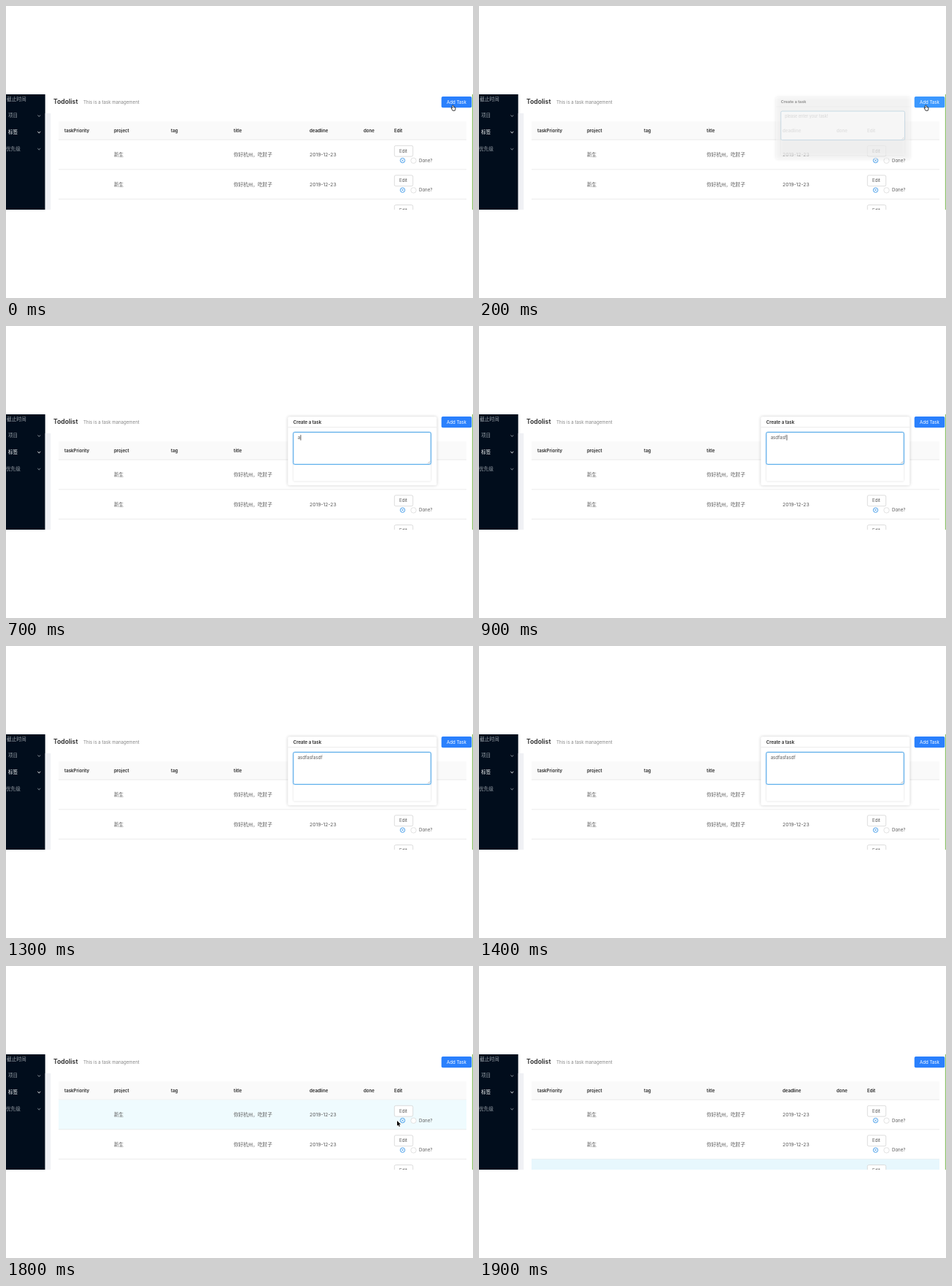
These frames come from a looping animation (640 px wide and 400 px high, 2 s). An HTML page with a canvas:

```html
<!DOCTYPE html>
<html lang="zh">
<head>
<meta charset="utf-8">
<title>Todolist</title>
<style>
  html, body { margin: 0; width: 100%; height: 100%; overflow: hidden; background: #fff; }
  canvas { display: block; width: 640px; height: 400px; }
</style>
</head>
<body>
<canvas id="stage"></canvas>
<script>
const W = 640, H = 400, STEP = 100, LOOP = 2000;
const TOP = 121, BOTTOM = 279;
const FONT = 'Inter, "Noto Sans CJK SC", "Noto Sans CJK", sans-serif';
const BLUE = '#2a80fd', BLUE_HOVER = '#3b98ff', INK = '#595959', DARK = '#262626';

const canvas = document.getElementById('stage');
const ctx = canvas.getContext('2d');
const dpr = window.devicePixelRatio || 1;
canvas.width = W * dpr;
canvas.height = H * dpr;

const lerp = (a, b, k) => a + (b - a) * k;
const clamp = v => Math.max(0, Math.min(1, v));

function text(str, x, y, color = INK, size = 6.1, weight = 400) {
  ctx.font = `${weight} ${size}px ${FONT}`;
  ctx.fillStyle = color;
  ctx.fillText(str, x, y);
}

function rect(x, y, w, h, color) {
  ctx.fillStyle = color;
  ctx.fillRect(x, y, w, h);
}

function box(x, y, w, h, r, fill, stroke, width = 0.8) {
  ctx.beginPath();
  ctx.roundRect(x, y, w, h, r);
  if (fill) { ctx.fillStyle = fill; ctx.fill(); }
  if (stroke) { ctx.strokeStyle = stroke; ctx.lineWidth = width; ctx.stroke(); }
}

function line(points, color, width = 0.8) {
  ctx.beginPath();
  points.forEach(([x, y]) => ctx.lineTo(x, y));
  ctx.strokeStyle = color;
  ctx.lineWidth = width;
  ctx.stroke();
}

function circle(x, y, r, color, width) {
  ctx.beginPath();
  ctx.arc(x, y, r, 0, 7);
  ctx.strokeStyle = color;
  ctx.lineWidth = width;
  ctx.stroke();
}

function shadow(blur, color, draw) {
  ctx.save();
  ctx.shadowBlur = blur * dpr;
  ctx.shadowColor = color;
  draw();
  ctx.restore();
}

function sidebar() {
  rect(0, TOP, 53.7, BOTTOM - TOP, '#010d1c');
  const grey = '#929aa2';
  text('截止时间', 1, 128, '#a3a9b0', 6.7);
  [['项目', 3, 150.5, grey], ['标签', 3, 173, '#fff'], ['优先级', 0, 196, grey]].forEach(([s, x, y, c]) => {
    text(s, x, y, c, 6.6);
    line([[43.4, y - 0.9], [45.3, y + 0.9], [47.2, y - 0.9]], c, 1);
  });
}

function header(hover) {
  text('Todolist', 65, 131.8, DARK, 8.7, 600);
  text('This is a task management', 106, 131.8, '#858585');
  box(596.7, 124, 41.6, 15.2, 2, hover ? BLUE_HOVER : BLUE);
  text('Add Task', 604, 131.8, '#fff');
}

function row(y, color) {
  if (color) rect(72, y, 559, 40.6, color);
  text('新生', 148, y + 20.7, INK, 6.6);
  text('你好杭州，吃肘子', 312, y + 20.7, INK, 6.6);
  text('2019-12-23', 416, y + 20.7, INK, 6.8);
  box(532.3, y + 8, 25.4, 14.8, 2, '#fff', '#d4d4d4');
  text('Edit', 539, y + 15.6);

  const cy = y + 28.3;
  circle(543.5, cy, 3.2, '#3a97e8', 0.9);
  line([[542.3, cy - 1.2], [544.7, cy + 1.2]], '#3a97e8', 0.8);
  line([[544.7, cy - 1.2], [542.3, cy + 1.2]], '#3a97e8', 0.8);
  box(554.9, cy - 3.4, 7.2, 7.2, 3.2, '#fff', '#d6d6d6', 0.7);
  text('Done?', 566, cy + 0.2);
  rect(72, y + 40.2, 559, 0.8, '#e6e6e6');
}

function table(hovers) {
  rect(53.7, 147, 7.6, BOTTOM - 147, '#f0f1f5');
  rect(72, 158, 559, 25, '#fafafa');
  rect(72, 182.7, 559, 0.8, '#e6e6e6');
  const heads = { taskPriority: 80, project: 148, tag: 226, title: 312, deadline: 416, done: 490, Edit: 532 };
  for (const name in heads) text(name, heads[name], 171, DARK, 6.1, 600);
  for (let i = 0; i < 3; i++) row(183.3 + i * 40.6, hovers[i]);
}

function popover(open, typed, focus, caret) {
  if (open <= 0) return;
  ctx.save();
  ctx.globalAlpha = open;
  const scale = lerp(0.8, 1, open);
  ctx.translate(594, 131);
  ctx.scale(scale, scale);
  ctx.translate(-594, -131);

  shadow(4, 'rgba(0,0,0,.2)', () => box(386.3, 124.2, 204, 94, 2, '#fff'));
  text('Create a task', 393.7, 131.8, DARK, 6.05, 600);
  rect(386.3, 138.4, 204, 0.8, '#e6e6e6');

  shadow(2.5, 'rgba(0,0,0,.16)', () => box(394, 146, 188, 66.5, 1, '#fff'));
  if (focus) box(393.8, 145.6, 188.4, 43.8, 2, null, 'rgba(24,144,255,.2)', 2.4);
  box(393.8, 145.6, 188.4, 43.8, 2, '#fff', focus ? '#4da6e8' : '#8db9d3', focus ? 1 : 0.9);
  line([[578, 188.3], [581, 185.3]], '#999', 0.6);
  line([[579.8, 188.3], [581, 187.1]], '#999', 0.6);

  if (typed) text(typed, 399.7, 153.2);
  else text('please enter your task!', 399.7, 153.2, '#b8b8b8');
  if (caret) {
    const x = 400.1 + (typed ? ctx.measureText(typed).width : 0);
    rect(x, 149.2, 0.8, 7.4, '#333');
  }
  ctx.restore();
}

function arrow(x, y) {
  const tip = [[0, 0], [0, 7], [1.6, 5.6], [2.7, 8], [3.9, 7.4], [2.8, 5.1], [5, 5]];
  ctx.beginPath();
  tip.forEach(([dx, dy]) => ctx.lineTo(x + dx, y + dy));
  ctx.closePath();
  ctx.lineWidth = 1;
  ctx.strokeStyle = '#fff';
  ctx.stroke();
  ctx.fillStyle = '#000';
  ctx.fill();
}

function hand(x, y) {
  box(x - 1.4, y - 3.6, 1.7, 5.5, 0.8, '#fff', '#111', 0.8);
  ctx.beginPath();
  [[-1.3, 0.2], [-2.5, -0.4], [-2.9, 0.4], [-0.9, 3.8], [2.2, 3.8], [2.9, 1.6], [2.9, -0.5], [0.3, -1]]
    .forEach(([dx, dy]) => ctx.lineTo(x + dx, y + dy));
  ctx.closePath();
  ctx.fillStyle = '#fff';
  ctx.fill();
  ctx.strokeStyle = '#111';
  ctx.lineWidth = 0.8;
  ctx.stroke();
  rect(x - 0.9, y - 2.6, 0.8, 3.6, '#fff');
}

function beam(x, y) {
  line([[x, y - 3], [x, y + 3]], '#222', 0.9);
  [-3.1, 3.1].forEach(d => line([[x - 1.4, y + d], [x + 1.4, y + d]], '#222', 0.8));
}

function pointer(t) {
  if (t < 300) hand(613, 139.5);
  else if (t < 700) {
    const k = clamp((t - 300) / 200);
    const x = lerp(613, 500, k), y = lerp(139.5, 164.5, k);
    if (x > 596) hand(x, y);
    else if (x > 582) arrow(x, y);
    else beam(x, y);
  } else if (t >= 1800 && t < 1900) arrow(536, 212);
}

function typedAt(t) {
  const count = t < 700 ? 0 : t <= 900 ? 1 + (t - 700) / 100 * 3 : 7 + (t - 900) / 100 * 1.5;
  return 'asdfasfasdf'.slice(0, Math.floor(count));
}

function draw(t) {
  ctx.setTransform(dpr, 0, 0, dpr, 0, 0);
  ctx.textBaseline = 'middle';
  rect(0, 0, W, H, '#fff');
  ctx.save();
  ctx.beginPath();
  ctx.rect(0, TOP, W, BOTTOM - TOP);
  ctx.clip();

  sidebar();
  table([t === 1800 && '#effbfe', false, t === 1900 && '#e7f7fd']);
  header(t >= 100 && t < 700);
  rect(638.8, TOP, 1.2, BOTTOM - TOP, '#8fc46c');

  const open = t < 1400 ? clamp((t - 100) / 200) : clamp((1600 - t) / 200);
  popover(open, typedAt(t), t >= 600, t >= 600 && t <= 1200);
  pointer(t);
  ctx.restore();
}

const start = performance.now();
function tick() {
  const t = (performance.now() - start) % LOOP;
  draw(Math.floor(t / STEP) * STEP);
  requestAnimationFrame(tick);
}
tick();
</script>
</body>
</html>
```
